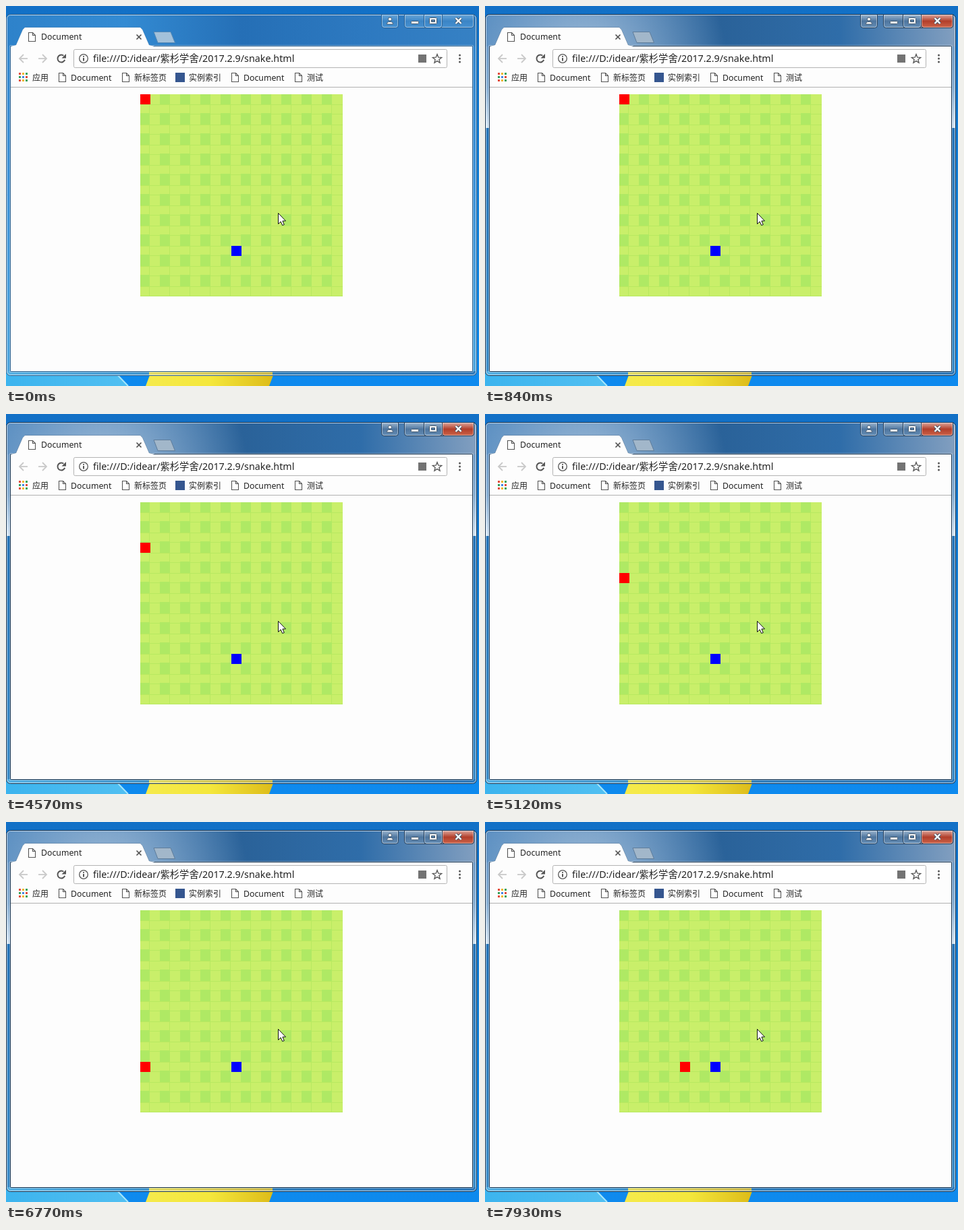
An HTML page with a canvas that plays this animation: 701x564 px, repeating every 8 s.

```html
<!DOCTYPE html>
<html lang="zh">
<head>
<meta charset="utf-8">
<title>Snake</title>
<style>
html, body { margin: 0; width: 100%; height: 100%; overflow: hidden; background: #1375c8; }
canvas { display: block; }
</style>
</head>
<body>
<canvas id="stage" width="701" height="564"></canvas>
<script>
const ctx = document.getElementById('stage').getContext('2d');
const LOOP = 8000, FOCUS = 690, SETTLE = 840;
const CELL = 15, LEFT = 199, TOP = 131, SIZE = 300, TURN = 15;
const START = 3950, SHOT = 140.7, RATE = 0.695, PHASE = 0.59;
const FONT = '"Noto Sans", "Noto Sans CJK SC", "Noto Sans CJK", sans-serif';
const GREY = '#555', PAPER = '#fdfdfd';

const white = a => `rgba(255,255,255,${a})`;

function rect(x, y, w, h, fill) {
  ctx.fillStyle = fill;
  ctx.fillRect(x, y, w, h);
}

// evenly spaced colours from one point to another
function ramp(x0, y0, x1, y1, ...colors) {
  const g = ctx.createLinearGradient(x0, y0, x1, y1);
  colors.forEach((c, i) => g.addColorStop(i / (colors.length - 1), c));
  return g;
}
const across = (...colors) => ramp(0, 0, 701, 0, ...colors);
const down = (y0, y1, ...colors) => ramp(0, y0, 0, y1, ...colors);

function paint(fill, stroke, width = 1) {
  if (fill) { ctx.fillStyle = fill; ctx.fill(); }
  if (stroke) { ctx.strokeStyle = stroke; ctx.lineWidth = width; ctx.stroke(); }
}

function trace(pts) {
  ctx.beginPath();
  pts.forEach(([x, y]) => ctx.lineTo(x, y));
}

function poly(pts, fill, stroke, width) {
  trace(pts);
  ctx.closePath();
  paint(fill, stroke, width);
}

function line(pts, color, width) {
  trace(pts);
  paint(null, color, width);
}

function box(x, y, w, h, r, fill, stroke) {
  ctx.beginPath();
  ctx.roundRect(x, y, w, h, r);
  paint(fill, stroke);
}

function arc(x, y, r, fill, stroke, width, from = 0, to = 7) {
  ctx.beginPath();
  ctx.arc(x, y, r, from, to);
  paint(fill, stroke, width);
}

function cross(x, y, r, color, width) {
  line([[x - r, y - r], [x + r, y + r]], color, width);
  line([[x + r, y - r], [x - r, y + r]], color, width);
}

function text(str, x, y, size) {
  ctx.font = `${size}px ${FONT}`;
  ctx.fillStyle = '#222';
  ctx.fillText(str, x, y);
}

function desktop() {
  rect(0, 0, 701, 564, down(0, 564, '#1270c6', '#1580d6', '#0e8aee'));
  poly([[0, 540], [158, 540], [181, 564], [0, 564]], across('#3cb4ee', '#8ee0fb'));
  line([[158, 540], [181, 564]], '#a6e6fb', 2);
  poly([[216, 540], [399, 540], [390, 564], [207, 564]], ramp(207, 0, 399, 0, '#f5ea4c', '#f4e73c', '#dcba18'));
}

function frame(active) {
  const edge = active ? '#17334f' : '#2b5f8d';
  // translucent border, with a bright horizon behind it when focused
  box(0.5, 12.5, 697, 536, 6, active
    ? down(181, 549, '#2373b8', '#3a8cc8')
    : down(13, 549, '#2d83cc', '#3c92d8', '#4da6de'));
  if (active) rect(1, 60, 696, 121, down(60, 181, '#6f9cc8', '#86aed3', '#d6e6f4'));
  rect(2, 542, 694, 6, across('#55b1e3', '#3180bd', '#2f78b8'));
  rect(212, 542, 183, 6, ramp(212, 0, 395, 0, '#e2dc66', '#cbb94c'));

  const bar = active
    ? across('#4a84bc', '#3f7ab4', '#2a6299', '#2f6da9', '#84a0c0')
    : across('#2e82ca', '#338bd3', '#256fb6', '#2d79c0', '#3681c4');
  box(1, 13, 696, 47, [5, 5, 0, 0], bar);
  if (active) {
    const glow = ctx.createRadialGradient(150, 90, 20, 150, 90, 210);
    glow.addColorStop(0, 'rgba(190,208,226,.7)');
    glow.addColorStop(1, 'rgba(190,208,226,0)');
    rect(1, 14, 696, 46, glow);
  }

  box(0.5, 12.5, 697, 536, 6, null, edge);
  box(1.5, 13.5, 695, 534, 5, null, white(0.65));
  box(5.5, 58.5, 687, 485, 1, null, white(0.35));
  box(6.5, 59.5, 685, 483, 1, null, edge);
  rect(7, 60, 684, 482, PAPER);
}

function button(x, w, fill, edge) {
  box(x + .5, 12.5, w, 20, [0, 0, 4, 4], fill, edge);
  box(x + 1.5, 13.5, w - 2, 18, [0, 0, 3, 3], null, white(0.45));
}

function caption(active) {
  const edge = active ? '#243f5c' : '#285f92', ink = '#40566c';
  const glass = active
    ? down(13, 32, '#9cb6cf', '#4f769f', '#648db5')
    : down(13, 32, '#68a5d8', '#3b85c6', '#4791d1');
  button(556, 25, glass, edge);
  button(590, 103, glass, edge);
  button(619, 27, null, edge);
  if (active) button(646, 47, down(13, 32, '#dda69b', '#b23f2b', '#cc644a'), edge);

  arc(569, 19.5, 2.5, '#fff', ink);
  box(564.5, 23.5, 9, 3.5, [3, 3, 0, 0], '#fff', ink);
  box(600.5, 22.5, 11, 4, 1, '#fff', ink);
  box(627.5, 17.5, 11, 9, 1, '#fff', ink);
  box(630.5, 20.5, 5, 3, 0, '#5c85ae', ink);
  cross(670.5, 22, 4, ink, 4.2);
  cross(670.5, 22, 4, '#fff', 2.4);
}

function page(x, y) {
  ctx.save();
  ctx.translate(x + .5, y + .5);
  poly([[0, 0], [6, 0], [10, 4], [10, 13], [0, 13]], '#fff', GREY, 1.1);
  line([[6, 0], [6, 4], [10, 4]], GREY, 1.1);
  ctx.restore();
}

function tabs(active) {
  const edge = active ? '#5f7d9b' : '#5488b5';
  const side = [[7, 60], [15, 58], [25, 35], [28, 32]];
  const mirror = side.map(([x, y]) => [234 - x - 7, y]).reverse();
  line([...side, ...mirror], edge);
  poly([...side, ...mirror], PAPER);
  poly([[219, 38.5], [244, 38.5], [250.5, 54.5], [225, 54.5]], active ? '#a2b7ca' : '#a3c1da', edge);
  page(33, 39);
  text('Document', 52, 50, 12.3);
  cross(197, 46, 3.5, GREY, 1.7);
}

function arrow(x, dir) {
  const tip = x + 6 * dir;
  line([[x - 6 * dir, 78], [tip, 78]], '#c9c9c9', 1.8);
  line([[x, 72], [tip, 78], [x, 84]], '#c9c9c9', 1.8);
}

function address() {
  arrow(26, -1);
  arrow(54, 1);
  arc(82, 78, 5.5, null, GREY, 2, 0.35, 5.35);
  poly([[89, 71], [89, 77.5], [82.5, 77.5]], GREY);

  box(100.5, 64.5, 553, 27, 2, '#fff', '#b3b3b3');
  arc(115, 78, 6.3, null, GREY, 1.3);
  rect(114, 77, 2, 4.5, GREY);
  rect(114, 74, 2, 1.7, GREY);
  text('file:///D:/idear/紫杉学舍/2017.2.9/snake.html', 129, 83, 14.3);
  rect(611, 72, 12, 12, '#737373');

  const star = Array.from({ length: 10 }, (_, i) => {
    const a = (i / 5 - 0.5) * Math.PI, r = i % 2 ? 3 : 7;
    return [639 + r * Math.cos(a), 78.6 + r * Math.sin(a)];
  });
  poly(star, null, GREY, 1.3);
  for (let i = -1; i <= 1; i++) arc(672.5, 78 + i * 5, 1.5, GREY);
}

function bookmarks() {
  const hues = ['#e2493b', '#f0b52a', '#33a25c', '#4285e8'];
  for (let i = 0; i < 9; i++) {
    const col = i % 3, row = Math.floor(i / 3);
    rect(19 + col * 5, 99 + row * 5, 3, 3, hues[(col + row * 2) % 4]);
  }
  text('应用', 39, 111, 12);

  const links = { 78: 'Document', 172: '新标签页', 334: 'Document', 428: '测试' };
  for (const [x, label] of Object.entries(links)) {
    page(+x, 99);
    text(label, +x + 18, 111, label === 'Document' ? 12.3 : 12);
  }
  rect(251, 99, 14, 14, '#35568f');
  text('实例索引', 271, 111, 12);
  rect(7, 120, 684, 1, '#b0b0b0');
}

function board() {
  ctx.save();
  ctx.beginPath();
  ctx.rect(LEFT, TOP, SIZE, SIZE);
  ctx.clip();
  rect(LEFT, TOP, SIZE, SIZE, '#c9ef6a');
  for (let p = 0; p < SIZE; p += 30) {
    rect(LEFT + p + 13, TOP, 1, SIZE, '#b8e960');
    rect(LEFT, TOP + p + 15, SIZE, 1, '#b8e960');
    rect(LEFT, TOP + p + 29, SIZE, 1, '#b8e960');
  }
  for (let x = 0; x < SIZE; x += 30) {
    for (let y = 0; y < SIZE; y += 30) {
      rect(LEFT + x - 1, TOP + y - 2, 15, 17, '#afe964');
    }
  }
  ctx.restore();
}

function block(col, row, color) {
  rect(LEFT + col * CELL, TOP + row * CELL, CELL, CELL, color);
}

function pointer(x, y) {
  const pts = [[0, 0], [0, 16], [3.7, 12.5], [6.2, 18], [8.8, 17], [6.4, 11.5], [11, 11.5]];
  poly(pts.map(([a, b]) => [x + a + .5, y + b + .5]), '#fff', '#111');
}

function stepsAt(t) {
  if (t < START) return 0;
  const shot = Math.floor((t - START) / SHOT);
  return 1 + Math.floor(shot * RATE + PHASE);
}

function draw(t) {
  const active = t >= FOCUS, n = stepsAt(t);
  desktop();
  frame(active);
  caption(active);
  tabs(active);
  address();
  bookmarks();
  board();
  block(9, 15, '#0000ff');
  block(Math.max(0, n - TURN), Math.min(n, TURN), '#ff0000');
  pointer(403, active && t < SETTLE ? 300 : 307);
}

function tick() {
  draw(performance.now() % LOOP);
  requestAnimationFrame(tick);
}
tick();
</script>
</body>
</html>
```
